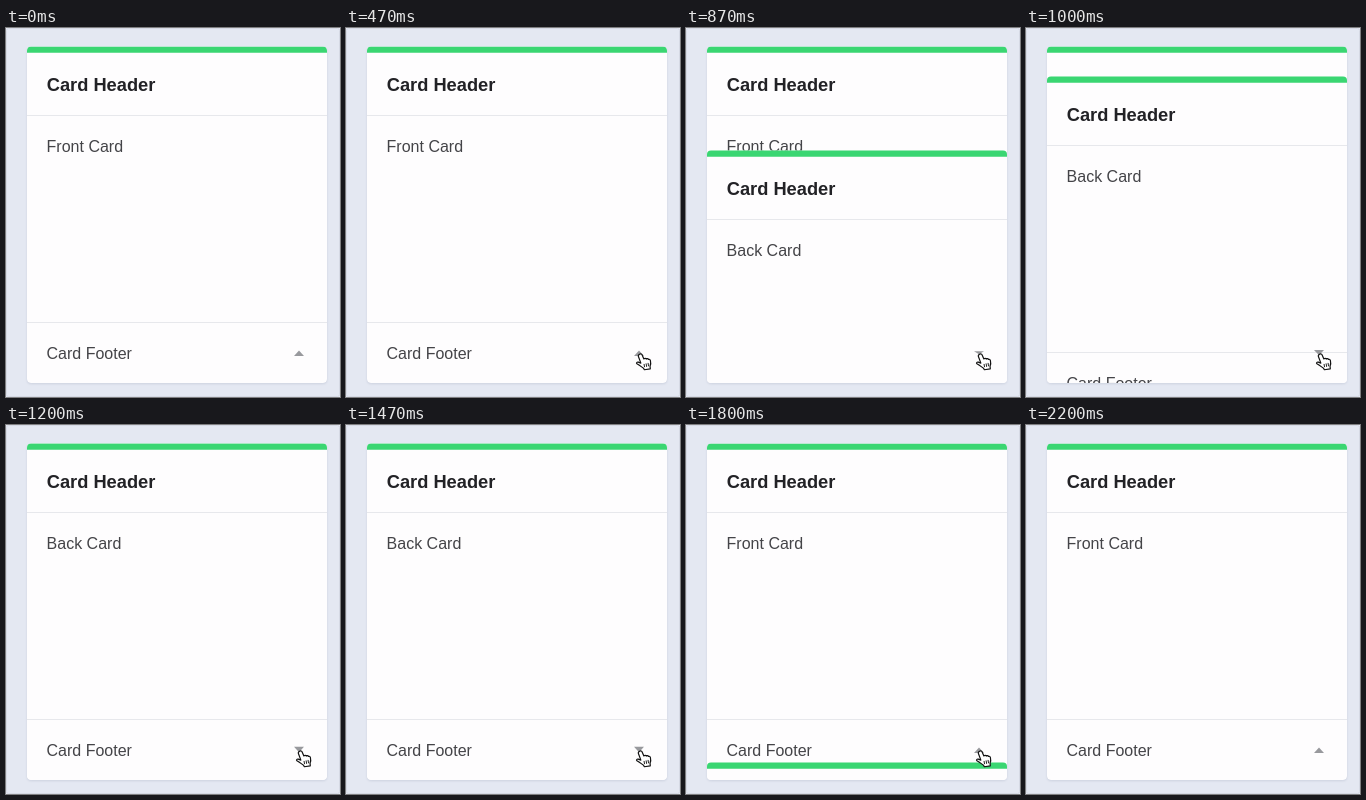
An HTML page for the animation above (2590 ms loop, 334 by 369 pixels).

```html
<!DOCTYPE html>
<html lang="en">
<head>
<meta charset="utf-8">
<title>Sliding card</title>
<style>
  html, body { margin: 0; width: 100%; height: 100%; overflow: hidden; background: #e4e8f2; }
  svg { display: block; width: 334px; height: 369px; }
  text { font: 16px "Liberation Sans", Arial, sans-serif; fill: #444448; }
  .title { font-size: 18.3px; font-weight: bold; fill: #222226; }
  .rule { fill: #e7e8ec; }
  .hand { fill: #fff; stroke: #111; stroke-width: 1.2; stroke-linejoin: round; }
</style>
</head>
<body>
<svg viewBox="0 0 334 369">
  <defs>
    <clipPath id="round"><rect x="21" y="18.6" width="300" height="336.4" rx="4"/></clipPath>
    <filter id="soft" x="-5%" y="-5%" width="110%" height="110%"><feGaussianBlur stdDeviation="1.3"/></filter>
    <g id="card">
      <rect x="21" y="18.6" width="300" height="336.4" rx="4" fill="#fefdfe"/>
      <path d="M21 24.7V22.6a4 4 0 0 1 4-4H317a4 4 0 0 1 4 4V24.7Z" fill="#3ad672"/>
      <text class="title" x="40.7" y="63">Card Header</text>
      <rect class="rule" x="21" y="87" width="300" height="1"/>
      <rect class="rule" x="21" y="294" width="300" height="1"/>
      <text x="40.5" y="331">Card Footer</text>
    </g>
  </defs>
  <rect width="334" height="369" fill="#e4e8f2"/>
  <rect x=".5" y=".5" width="333" height="368" rx="2" fill="none" stroke="#d5d9e4"/>
  <rect x="21" y="20" width="300" height="336" rx="4" fill="#c3c9d8" opacity=".7" filter="url(#soft)"/>
  <g clip-path="url(#round)">
    <use href="#card"/>
    <text x="40.6" y="124">Front Card</text>
    <g id="back">
      <use href="#card"/>
      <text x="40.6" y="124">Back Card</text>
    </g>
  </g>
  <path id="arrow" d="M-5 2.7L0 -2.7L5 2.7Z" fill="#98999d"/>
  <g id="cursor">
    <g transform="translate(-.4 .4) rotate(-9 8 10) scale(1 .95)">
      <path class="hand" d="M5.2 1.5C6.5 .8 7.5 1.5 7.8 2.8L8.8 7C9.5 6.3 11 6.5 11.2 7.5C12 6.8 13 7.2 13.3 8.2C14.2 8 15 8.6 15 9.8C15.2 12 15 13.5 13.8 15.5L13.6 18.3H7.6L7 16.5C5 14.5 3.5 12.8 1.2 10.8C.4 9.8 1.5 8.8 2.8 9.4L5.2 10.8L3.8 3.5C3.6 2.5 4.2 1.7 5.2 1.5Z"/>
      <path d="M8.2 12.2V15.6M10.3 12V15.6M12.3 11.8V15.4" stroke="#111" stroke-width=".9"/>
    </g>
  </g>
</svg>
<script>
const LOOP = 2590, STEP = 200 / 3, TRAVEL = 336;
const [back, arrow, cursor] = ["back", "arrow", "cursor"].map(id => document.getElementById(id));
const part = (t, start, length) => Math.min(1, Math.max(0, (t - start) / length));
const move = (el, x, y, extra = "") => el.setAttribute("transform", `translate(${x} ${y}) ${extra}`);
const show = (el, on) => el.setAttribute("visibility", on ? "visible" : "hidden");

// Share of the back card that has slid into view
function raised(t) {
  if (t < 1467) return 1 - (1 - part(t, 661, 533)) ** 2.4;
  return 1 - Math.sin(part(t, 1467, 416.5) * Math.PI / 2);
}

function draw(time) {
  // The motion advances at 15 steps per second
  const t = Math.floor((time + 4) / STEP) * STEP;
  const up = raised(t);
  show(back, up > 0.001);
  move(back, 0, Math.round(TRAVEL * (1 - up)));
  move(arrow, 293, 325.3 - 0.8 * up, `scale(1 ${Math.cos(Math.PI * up)})`);

  const away = (1 - part(t, 133, 333)) ** 2;
  const leave = t > 2120 ? 9 : 0;
  show(cursor, t > 130 && t < 2190);
  move(cursor, Math.round(290 + 27 * away + leave), Math.round(324 + 13 * away));
}

const begin = performance.now();
function tick() {
  draw((performance.now() - begin) % LOOP);
  requestAnimationFrame(tick);
}
tick();
</script>
</body>
</html>
```
